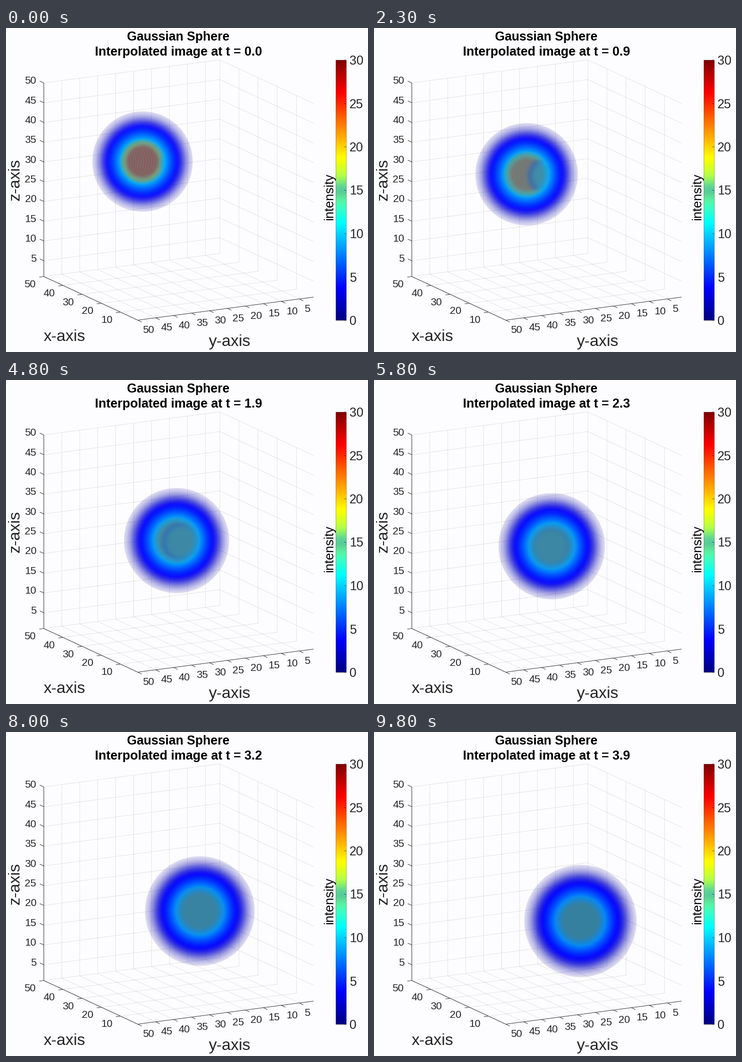
Write a matplotlib script that moves like this. It is 721 px wide and 646 px high and loops after 10 s.

```python
import numpy as np
import matplotlib.pyplot as plt
from matplotlib.animation import FuncAnimation

W, H, DPI = 721, 646, 64
PX = 72 / DPI                      # points per pixel
BG, DARK = "#fdfcfe", "#262626"

plt.rcParams["font.family"] = "Liberation Sans"
fig = plt.figure(figsize=(W / DPI, H / DPI), dpi=DPI, facecolor=BG)
ax = fig.add_axes([0, 0, 1, 1])
ax.set_xlim(0, W)
ax.set_ylim(H, 0)
ax.axis("off")


def line(a, b, alpha=1.0, z=3, width=0.9):
    ax.plot([a[0], b[0]], [a[1], b[1]], color=DARK, alpha=alpha, snap=False,
            lw=width * PX, zorder=z, solid_capstyle="butt")


def text(x, y, s, size, ha="left", color=DARK, **kw):
    return ax.text(x, y, s, fontsize=size * PX, ha=ha, va="baseline",
                   color=color, zorder=5, **kw)


def ramp(a, b, v):
    u = np.clip((v - a) / (b - a), 0, 1)
    return u * u * (3 - 2 * u)


def mix(rgb, color, weight):
    return rgb + (color - rgb) * np.asarray(weight)[..., None]


def jet(v):
    """Blue-cyan-yellow-red map for v in 0..1."""
    v = np.asarray(v)[..., None]
    return np.clip(1.5 - np.abs(4 * v - np.array([3, 2, 1])), 0, 1)


# Orthographic box: data runs from 1 to 50 on every axis
ORIGIN = np.array([75.3, 495.5])   # x = 50, y = 50, z = 1
XV = np.array([187.0, 87.0])
YV = np.array([350.5, -46.0])
ZV = np.array([0.0, -386.0])


def project(x, y, z):
    return (ORIGIN + XV * (50 - x) / 49 + YV * (50 - y) / 49
            + ZV * (z - 1) / 49)


def grid(*pts):
    for a, b in zip(pts, pts[1:]):
        line(a, b, alpha=0.125, z=1)


X_TICKS = range(10, 51, 10)
TICKS = range(5, 51, 5)
TICK_PX = 20.7

for v in X_TICKS:
    grid(project(v, 50, 1), project(v, 1, 1), project(v, 1, 50))
for v in TICKS:
    grid(project(1, v, 1), project(50, v, 1), project(50, v, 50))
    grid(project(50, 50, v), project(50, 1, v), project(1, 1, v))

line(project(50, 50, 1), project(50, 50, 50))
line(project(50, 50, 1), project(1, 50, 1))
line(project(1, 50, 1), project(1, 1, 1))

half = 0.344 * TICK_PX
for v in X_TICKS:
    p = project(v, 50, 1)
    line(p, p + (-9, 1.2))
    text(p[0] - 16, p[1] + 14.5 + half, str(v), TICK_PX, "right")
for v in TICKS:
    p = project(1, v, 1)
    line(p, p + (8, 3.7))
    text(p[0] + 10, p[1] + 18.5 + half, str(v), TICK_PX)
    p = project(50, 50, v)
    line(p, p + (-8, -3.7))
    text(60.5, p[1] - 5.5 + half, str(v), TICK_PX, "right")

text(116.5, 624, "x-axis", 32, "center")
text(446, 634, "y-axis", 32, "center")
text(26.5, 302.5, "z-axis", 32, "center", rotation=90,
     rotation_mode="anchor")

# Colour bar, slightly dulled around the middle
BAR_L, BAR_R, BAR_T, BAR_B = 657, 678, 64, 583
level = np.linspace(1, 0, 256)[:, None]
bar = mix(jet(level), np.array([.35, .8, .6]),
          np.exp(-((level - .5) / .035) ** 2))
ax.imshow(bar, aspect="auto", extent=(BAR_L, BAR_R, BAR_B, BAR_T), zorder=2)
ax.add_patch(plt.Rectangle((BAR_L, BAR_T), BAR_R - BAR_L, BAR_B - BAR_T,
                           fill=False, ec=DARK, lw=0.6 * PX, alpha=0.6,
                           snap=False, zorder=3))
for v in range(0, 31, 5):
    y = BAR_B - (BAR_B - BAR_T) * v / 30
    line((BAR_R - 5, y), (BAR_R, y), alpha=0.7, width=0.8)
    text(684, y + 9, str(v), 25)
text(651, 336.5, "intensity", 25.5, "center", color="black",
     rotation=90, rotation_mode="anchor")

text(343.5, 24.5, "Gaussian Sphere", 25, "center", "black", weight="bold")
title = text(343.5, 55, "", 25.3, "center", "black", weight="bold")

TEAL = np.array([.28, .56, .66])
OLIVE = np.array([.45, .63, .50])
BROWN = np.array([.52, .39, .39])
DEEP = np.array([.12, .40, .76])
BOX = 240


def ball(t):
    cx, cy = 271.9 + 35.7 * t, 266.2 + 28.35 * t
    radius = 100 + 2 * t + 0.27 * t * t
    left, top = int(cx) - BOX // 2, int(cy) - BOX // 2
    px, py = np.meshgrid(left + np.arange(BOX) + .5, top + np.arange(BOX) + .5)
    dx, dy = (px - cx) / radius, (py - cy) / radius
    rho = np.hypot(dx, dy)

    # Gaussian intensity, capped where the front layers hide the peak
    value = (15.3 - 0.5 * t) * np.exp(-2.8 * rho ** 2)
    rgb = jet(np.minimum(value, 9.2 - 0.35 * t) / 30)
    rgb = mix(rgb, TEAL - 0.015 * t, 0.95 * ramp(.5, .27, rho))

    # The hot core is covered from the right by a cooler disc as it decays
    reach = 0.37 - 0.31 * t
    gap = np.hypot(dx - reach - .33, dy - .03) - .33
    hot = ramp(-.07, .07, gap) * max(0, 1 - t / 2.2)
    stripes = 0.05 * np.sin(2 * np.pi * (px + 0.012 * (py - cy) ** 2) / 5.2)
    brown = BROWN + stripes[..., None] * np.array([1, -1, -0.6])
    rgb = mix(rgb, OLIVE, hot * ramp(.47, .35, rho))
    rgb = mix(rgb, brown, hot * ramp(.38, .26, rho))
    band = np.exp(-((gap - 0.02) / 0.07) ** 2) * ramp(.42, .28, rho)
    rgb = mix(rgb, DEEP, band * 0.5 * ramp(0, .8, t) * ramp(2.6, 1.8, t))

    alpha = 1 - np.exp(-49 * np.exp(-5.92 * rho ** 2))
    alpha = alpha * np.clip(radius * (1 - rho) + .5, 0, 1)
    rgba = np.clip(np.dstack([rgb, alpha]), 0, 1)
    return rgba, (left, left + BOX, top + BOX, top)


sphere = ax.imshow(np.zeros((BOX, BOX, 4)), aspect="auto", zorder=2,
                   interpolation="nearest", extent=(0, BOX, BOX, 0))


def update(i):
    t = (2 * i // 5) / 10          # a new image every 2.5 ticks
    rgba, extent = ball(t)
    sphere.set_data(rgba)
    sphere.set_extent(extent)
    title.set_text(f"Interpolated image at t = {t:.1f}")
    return sphere, title


anim = FuncAnimation(fig, update, frames=100, interval=100,
                     init_func=lambda: update(0), repeat=True, repeat_delay=0)
plt.show()
```
